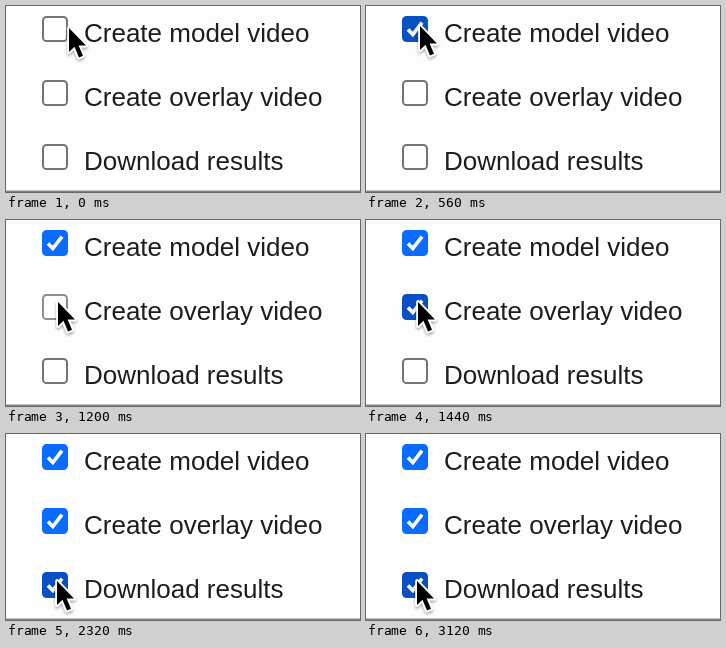
Recreate the animation shown at these times as an HTML page. Size 354 by 186 pixels, loop 3.2 s.

```html
<!DOCTYPE html>
<html lang="en">
<head>
<meta charset="utf-8">
<title>Checkbox list</title>
<style>
  html, body { margin: 0; width: 100%; height: 100%; overflow: hidden; background: #fdfdfd; }
  svg { display: block; width: 354px; height: 186px; }
  text { font: 26px "Liberation Sans", Arial, sans-serif; fill: #1d1d1f; }
</style>
</head>
<body>
<svg id="stage" viewBox="0 0 354 186">
  <defs>
    <filter id="shadow" x="-50%" y="-30%" width="200%" height="180%">
      <feDropShadow dx="0" dy="2" stdDeviation="1.6" flood-color="#000" flood-opacity=".35"/>
    </filter>
  </defs>
  <rect width="354" height="186" fill="#fdfdfd"/>
  <rect y="184.5" width="354" height="1.5" fill="#858585"/>
  <g id="rows"></g>
  <g id="cursor" filter="url(#shadow)">
    <path d="M1 2V26L6.5 20.8L11 31.4L15 29.7L10.6 19.4H18Z" fill="#000" stroke="#fff"
          stroke-width="3.6" stroke-linejoin="round" paint-order="stroke"/>
  </g>
</svg>
<script>
const LOOP = 3200, STEP = 80, PRESS = 160;
const SVG = "http://www.w3.org/2000/svg";

const rows = [
  { label: "Create model video", top: 10, checkedAt: 400 },
  { label: "Create overlay video", top: 74, checkedAt: 1280 },
  { label: "Download results", top: 138, checkedAt: 2000 },
];

// Pointer tip: time, x, y
const path = [
  [0, 62, 20], [160, 53, 18], [580, 53, 18], [800, 41, 131], [880, 41, 127],
  [1120, 51, 80], [1440, 51, 80], [1680, 50, 139], [1760, 50, 137],
  [1920, 50, 145], [LOOP, 50, 145],
];

function add(parent, tag, attrs) {
  const el = document.createElementNS(SVG, tag);
  for (const key in attrs) el.setAttribute(key, attrs[key]);
  return parent.appendChild(el);
}

for (const row of rows) {
  const group = add(document.getElementById("rows"), "g", { transform: `translate(36 ${row.top})` });
  row.box = add(group, "rect", { x: 1, y: 1, width: 24, height: 24, rx: 3.6, "stroke-width": 2 });
  row.tick = add(group, "path", {
    d: "M6 13.6L10.8 18.6L20 6.6", fill: "none", stroke: "#fff", "stroke-width": 3.6,
  });
  add(group, "text", { x: 42, y: 26 }).textContent = row.label;
}

const cursor = document.getElementById("cursor");
const ease = u => u * u * (3 - 2 * u);

function tipAt(t) {
  const i = path.findIndex(p => p[0] > t);
  const [t0, x0, y0] = path[i - 1], [t1, x1, y1] = path[i];
  const u = ease((t - t0) / (t1 - t0));
  return [x0 + (x1 - x0) * u, y0 + (y1 - y0) * u];
}

function render(time) {
  const t = Math.floor((time % LOOP) / STEP) * STEP;
  const [x, y] = tipAt(t);
  cursor.setAttribute("transform", `translate(${x} ${y})`);

  for (const row of rows) {
    const checked = t >= row.checkedAt;
    const pressed = !checked && t >= row.checkedAt - PRESS;
    const hovered = x < 61 && Math.abs(y - row.top - 13) <= 26;
    const blue = hovered ? "#0a50c2" : "#0a6cff";
    const border = pressed ? "#8d8d8d" : hovered ? "#4a4a4a" : "#747474";
    row.box.setAttribute("fill", checked ? blue : "#fff");
    row.box.setAttribute("stroke", checked ? blue : border);
    row.tick.setAttribute("visibility", checked ? "visible" : "hidden");
  }
}

const start = performance.now();
function tick() {
  render(performance.now() - start);
  requestAnimationFrame(tick);
}
tick();
</script>
</body>
</html>
```
